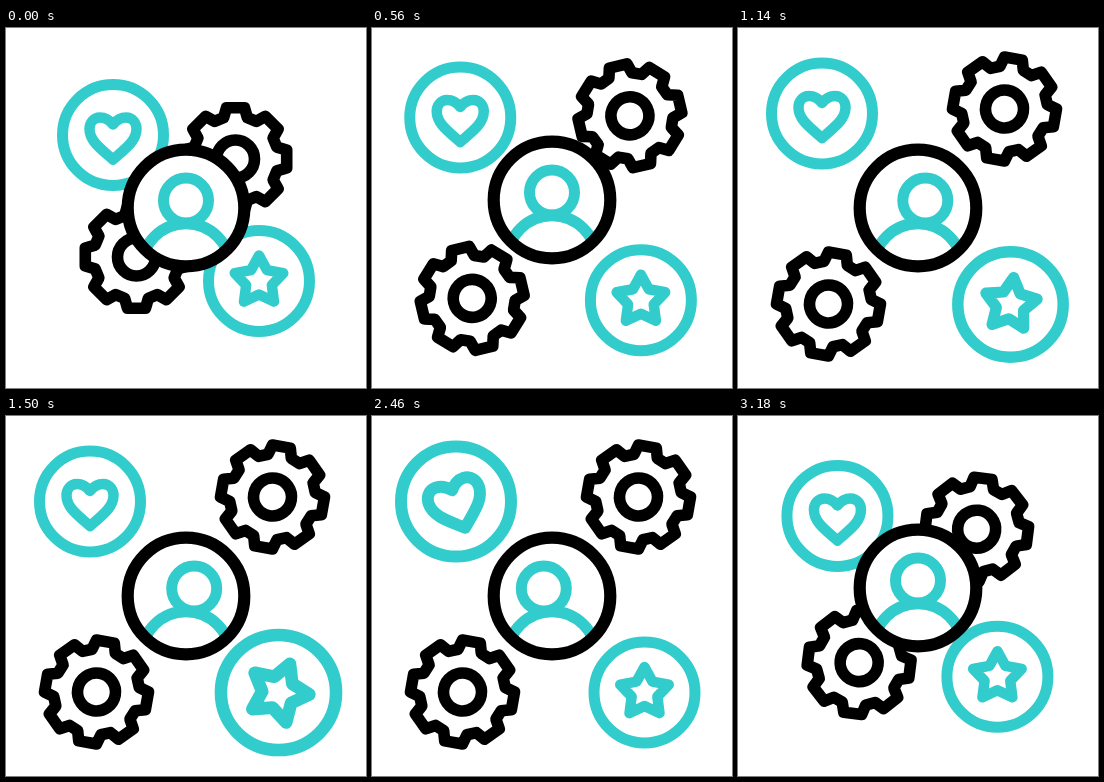
Write an HTML page with a canvas that moves like this. It is 360 px wide and 360 px high and loops after 3.2 s.

```html
<!DOCTYPE html>
<html lang="en">
<head>
<meta charset="utf-8">
<title>Team values</title>
<style>
html, body { margin: 0; width: 100%; height: 100%; overflow: hidden; background: #fff; }
canvas { display: block; width: 360px; height: 360px; }
</style>
</head>
<body>
<canvas id="stage" width="360" height="360"></canvas>
<script>
const ctx = document.getElementById('stage').getContext('2d');
const LOOP = 3200, TEAL = '#33cccc', BLACK = '#000', TAU = Math.PI * 2;

const clamp = x => Math.min(1, Math.max(0, x));
const mix = (a, b, k) => a + (b - a) * k;
const smooth = x => { x = clamp(x); return x * x * (3 - 2 * x); };

// cubic-bezier(.25, .1, .25, 1)
function ease(x) {
  if (x <= 0) return 0;
  if (x >= 1) return 1;
  let lo = 0, hi = 1, u = 0.5;
  for (let i = 0; i < 24; i++) {
    u = (lo + hi) / 2;
    if (0.75 * u * (1 - u) + u ** 3 < x) lo = u; else hi = u;
  }
  return 0.3 * u * (1 - u) ** 2 + 3 * u * u * (1 - u) + u ** 3;
}

// Rises, holds and falls between two times
const hold = (t, from, to) => smooth((t - from) / 190) * smooth((to - t) / 190);

// Soft swell between two times
function swell(t, from, to) {
  return Math.sin(Math.PI * clamp((t - from) / (to - from))) ** 2;
}

// Out at the start of the loop, back in at its end
function spread(t, begin, span) {
  return ease((t - begin) / span) - ease((t - 2875) / 780);
}

function ring(x, y, r, color, width) {
  ctx.beginPath();
  ctx.arc(x, y, r, 0, TAU);
  ctx.strokeStyle = color;
  ctx.lineWidth = width;
  ctx.stroke();
}

function at(x, y, deg, scale, draw) {
  ctx.save();
  ctx.translate(x, y);
  ctx.rotate(deg * Math.PI / 180);
  ctx.scale(scale, scale);
  draw();
  ctx.restore();
}

const heartPath = new Path2D(
  'M0-10.5C-4-15.5-9-17.5-13-17.5C-20-17.5-23.5-11.5-23.5-6C-23.5 6-12 14 0 24.5' +
  'C12 14 23.5 6 23.5-6C23.5-11.5 20-17.5 13-17.5C9-17.5 4-15.5 0-10.5Z');

const starPath = new Path2D();
for (let i = 0; i < 10; i++) {
  const r = i % 2 ? 13.5 : 25.5, a = i * TAU / 10;
  starPath.lineTo(r * Math.sin(a), -r * Math.cos(a));
}
starPath.closePath();

const gearPath = new Path2D();
for (let i = 0; i < 8; i++) {
  for (const [deg, r] of [[-16, 43], [-10, 52], [10, 52], [16, 43]]) {
    const a = (i * 45 + deg) * Math.PI / 180;
    gearPath.lineTo(r * Math.sin(a), -r * Math.cos(a));
  }
}
gearPath.closePath();

function outline(path, color, width) {
  ctx.strokeStyle = color;
  ctx.lineWidth = width;
  ctx.stroke(path);
}

function badge(x, y, path, grow, deg) {
  at(x, y, 0, 1 + grow, () => {
    ring(0, 0, 50.5, TEAL, 11);
    at(0, 0, deg, 1 + 0.45 * grow, () => outline(path, TEAL, 10.5));
  });
}

function gear(x, y, deg) {
  at(x, y, deg, 1, () => {
    outline(gearPath, BLACK, 11.6);
    ring(0, 0, 19, BLACK, 11.6);
  });
}

function person(y, headShift) {
  ctx.save();
  ctx.beginPath();
  ctx.arc(180, y, 58, 0, TAU);
  ctx.fillStyle = '#fff';
  ctx.fill();
  ctx.clip();
  ring(180, y + 60, 44.5, TEAL, 11.3);
  ctx.restore();
  ring(180 + headShift, y - 7.5, 22.5, TEAL, 11);
  ring(180, y, 58.3, BLACK, 12.2);
}

function draw(t) {
  const p = spread(t, 230, 645);
  const starSwell = swell(t, 990, 1840), heartSwell = swell(t, 1840, 2720);
  ctx.fillStyle = '#fff';
  ctx.fillRect(0, 0, 360, 360);
  ctx.lineJoin = 'round';

  badge(mix(107, 84, p), mix(107, 85.5, p), heartPath, 0.14 * heartSwell, -30 * heartSwell);
  badge(mix(253, 272.5, p), mix(253, 276.5, p), starPath, 0.155 * starSwell, 24 * starSwell);

  // The gears leave on curved paths while turning
  const s = p ** 1.2, bend = 2 * s * (1 - s);
  const turn = 55 * spread(t, 215, 780) ** 1.83;
  gear(229.5 + 17 * bend + 37 * s * s, 131 - 37 * bend - 50 * s * s, turn);
  gear(130.5 - 17 * bend - 40 * s * s, 229 + 37 * bend + 47 * s * s, turn);

  const lift = 8 * (hold(t, 215, 1000) + hold(t, 2860, 3640));
  const lean = 8.2 * (hold(t, 990, 1840) - hold(t, 1840, 2720));
  person(180 - lift, lean);
}

const start = performance.now();
function tick() {
  draw((performance.now() - start) % LOOP);
  requestAnimationFrame(tick);
}
tick();
</script>
</body>
</html>
```
